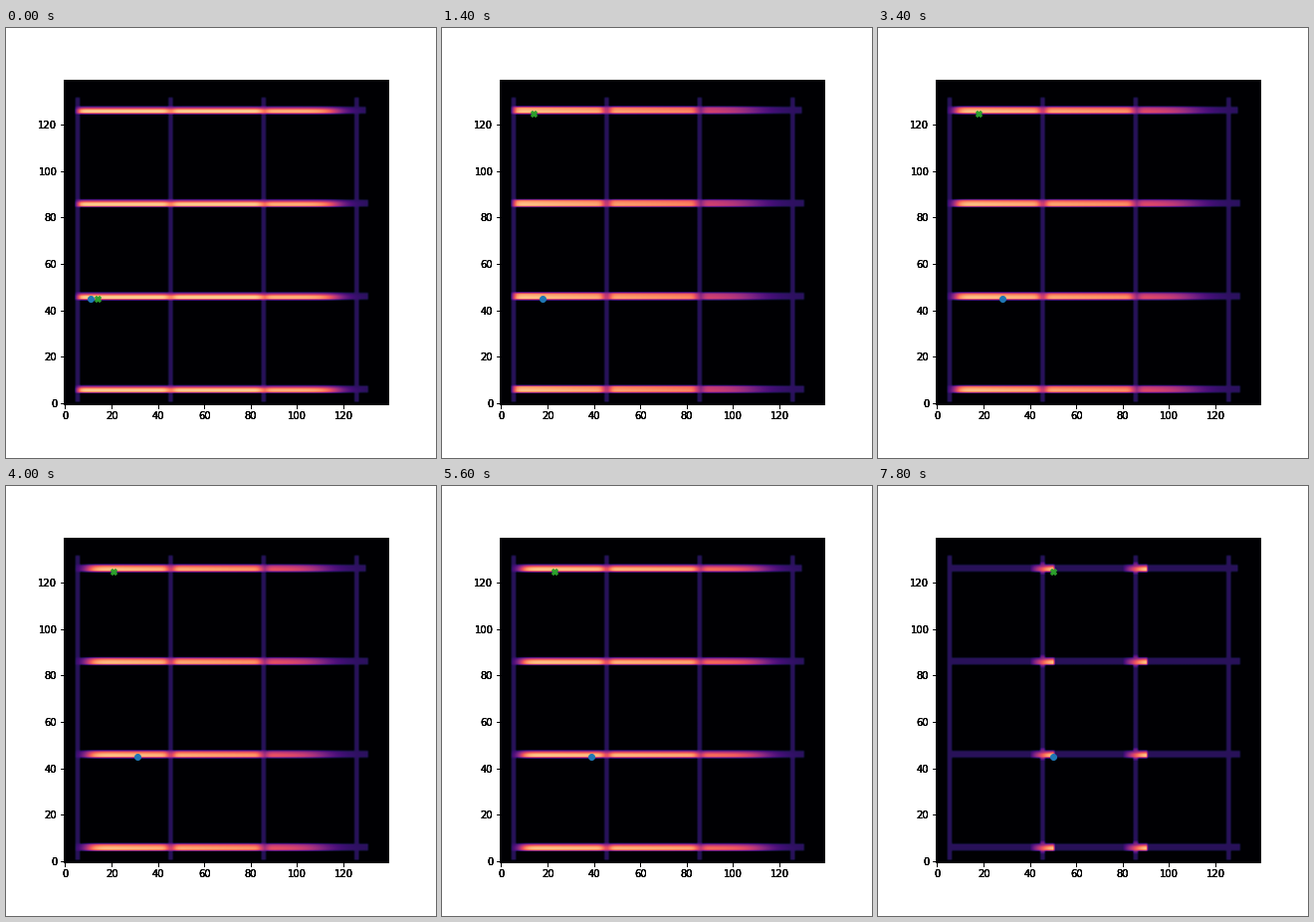
Write a matplotlib script that moves like this. It is 432 px wide and 432 px high and loops after 8000 ms.

```python
import numpy as np
import matplotlib.pyplot as plt
from matplotlib.animation import FuncAnimation

N = 140
FRAMES = 40
BASE = 0.16
LANES = range(5, 126, 40)
CROSSINGS = (45, 85)
SPLIT = 34            # first step inside the crossing
CYCLE = 10            # steps between two corrections of the drift

cols = np.arange(N)


def sigmoid(x):
    return 1 / (1 + np.exp(-x))


def street_map():
    grid = np.zeros((N, N))
    for lane in LANES:
        grid[1:132, lane:lane + 2] = BASE
        grid[lane:lane + 3, 5:130 if lane == 125 else 131] = BASE
    return grid


def sharpness(k):
    """How far the belief has pulled in toward the left end."""
    return np.interp(k, (0, 7, 13, 33), (0, 1, 1, 0.4))


def drift(k):
    return max(k - 13, 0) % CYCLE


def corridor_belief(k):
    s = sharpness(k)
    level = 0.74 - 0.0018 * s * cols
    level -= (0.06 + 0.1 * s) * (cols > 85)
    rise = sigmoid((cols - 5.5 - 0.6 * drift(k)) / (0.7 + 0.15 * drift(k)))
    fade = sigmoid((117 - 8 * s - cols) / (3 + 2 * s))
    belief = level * rise * fade
    for c in CROSSINGS:
        belief *= 1 - (0.2 + 0.25 * s) * np.exp(-((cols - c - 0.5) / 2) ** 2)
    return belief


def crossing_belief(k):
    belief = np.zeros(N)
    for c in CROSSINGS:
        lag = c + k - SPLIT - cols
        glow = 0.72 * (1 - np.clip(lag / 10, 0, 1) ** 1.5)
        belief += np.where(lag >= 0, glow, 0)
        belief[cols < c - 4] *= cols[cols < c - 4] < CROSSINGS[0] + 10
    return belief


def field(k):
    grid = street.copy()
    keep = np.clip(1 - 0.22 * (k - SPLIT + 1), 0, 1)
    belief = keep * corridor_belief(k)
    if k >= SPLIT:
        belief = np.maximum(belief, crossing_belief(k))
        for lane in LANES:
            for c in CROSSINGS:
                grid[[lane - 1, lane + 3], c:c + 2] += 0.15
    rows = (1, 0.97, 0.45 + 0.4 * sharpness(k) ** 2)
    for lane in LANES:
        grid[lane:lane + 3, 5:131] += np.outer(rows, belief[5:131])
    return grid


def best_guess(k):
    if k >= SPLIT:
        return k + 11, 125
    return 14 + drift(k) + 4 * (k >= 13 + CYCLE), 45 if k < 4 else 125


street = street_map()
ticks = range(0, N, 20)

fig, ax = plt.subplots(figsize=(6, 6), dpi=72)
fig.subplots_adjust(left=0.125, right=0.9, bottom=0.125, top=0.88)
image = ax.imshow(field(0), cmap="magma", vmin=0, vmax=1,
                  origin="lower", interpolation="bilinear")
robot = ax.scatter([11], [45], s=36, color="C0", zorder=3)
guess = ax.scatter([14], [45], s=36, color="C2", marker="X", zorder=4)
ax.set(xticks=ticks, yticks=ticks)
ax.set(xlim=(-0.5, N - 0.5), ylim=(-0.5, N - 0.5))

# Stacked axes give the labels their heavy, hard edges
for i in range(4):
    extra = fig.add_subplot(111, label=f"stack{i}", facecolor="none")
    extra.set(xticks=ticks, yticks=ticks, aspect="equal")
    extra.set(xlim=ax.get_xlim(), ylim=ax.get_ylim())


def update(k):
    image.set_data(field(k))
    robot.set_offsets([(11 + k, 45)])
    guess.set_offsets([best_guess(k)])
    return image, robot, guess


anim = FuncAnimation(fig, update, frames=FRAMES, interval=200,
                     repeat=True, repeat_delay=0, blit=False)
plt.show()
```
